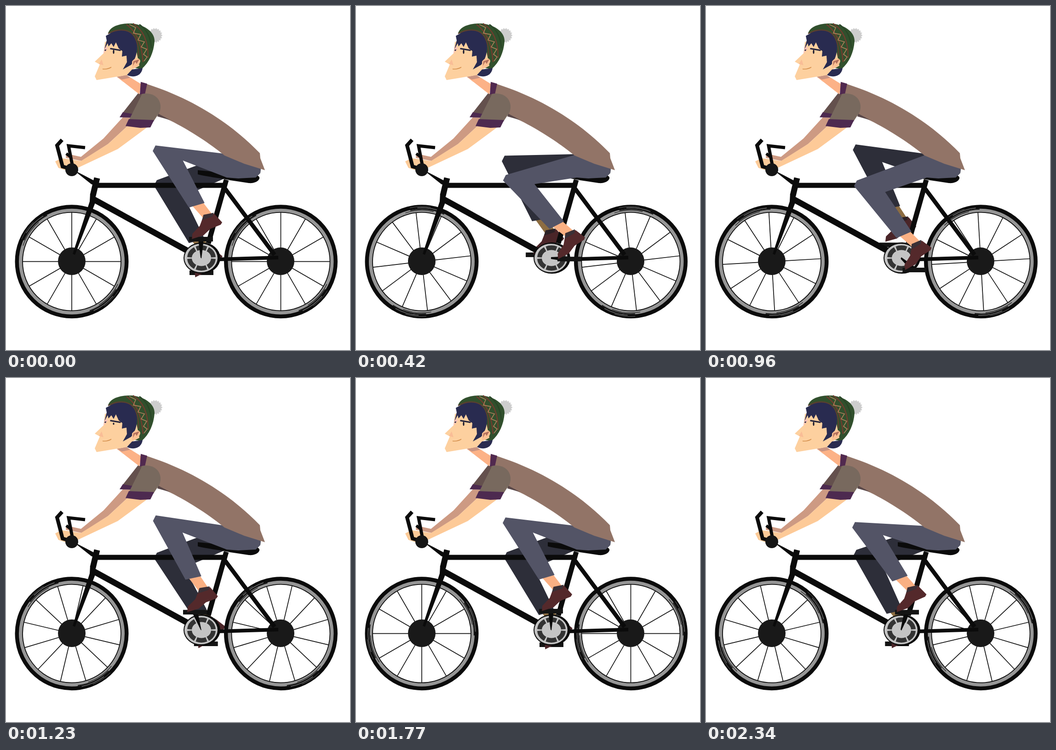
These frames come from a looping animation (748 by 748 pixels, 2370 ms). An HTML page:

```html
<!DOCTYPE html>
<html lang="en">
<head>
<meta charset="utf-8">
<title>Cyclist</title>
<style>
html, body { margin: 0; width: 100%; height: 100%; overflow: hidden; background: #fff; }
svg { display: block; width: 100%; height: 100%; }
.line { fill: none; stroke: #0b0b0b; }
</style>
</head>
<body>
<svg viewBox="0 0 748 748">
  <defs>
    <g id="wheel">
      <circle r="118.5" class="line" stroke-width="10"/>
      <circle r="111" fill="none" stroke="#969696" stroke-width="8"/>
      <circle r="107" class="line" stroke-width="1.8"/>
      <g id="grain" fill="none"/>
      <g id="spokes" stroke="#111" stroke-width="1.7"/>
    </g>
  </defs>

  <g id="farLeg"></g>

  <g id="front"><use href="#wheel"/></g>
  <g id="rear"><use href="#wheel"/></g>
  <circle cx="143" cy="555" r="30" fill="#191919"/>
  <circle cx="597" cy="555" r="30" fill="#191919"/>

  <g id="bike" class="line">
    <path d="M195 390H472" stroke-width="11"/>
    <path d="M190 420L396 533" stroke-width="13"/>
    <path d="M479 378L440 516" stroke-width="11"/>
    <path d="M474 394L584 541" stroke-width="9"/>
    <path d="M458 551L592 547" stroke-width="8"/>
    <path d="M198 374L189 412" stroke-width="13"/>
    <path d="M183 408L195 412L194 428L150 541L145 539L182 425Z" fill="#0b0b0b" stroke="none"/>
    <path d="M146 356L194 381L194 391L185 387Z" fill="#0b0b0b" stroke="none"/>
    <path d="M417 357L470 362C520 364 554 364 551 375C549 382 538 386 528 385L488 379C465 374 430 370 417 366Z" fill="#0b0b0b" stroke="none"/>
  </g>

  <g id="ring">
    <ellipse cx="426" cy="548" rx="40" ry="34" fill="#0b0b0b"/>
    <ellipse cx="424" cy="548" rx="36" ry="31" fill="#c4c4c4"/>
    <ellipse cx="425" cy="548" rx="26" ry="22.5" fill="none" stroke="#333" stroke-width="10"
      pathLength="60" stroke-dasharray="8.7 1.3" stroke-dashoffset="-.65"/>
  </g>

  <g id="nearLeg"></g>

  <g id="body">
    <path d="M254 242L274 243L263 262L222 300L165 337L130 330L131 321L163 328L212 288Z" fill="#cd9a83"/>
    <path d="M287 190L313 196L282 238L254 232Z" fill="#64504d"/>
    <path d="M254 231L283 236L276 243L247 242Z" fill="#4d2a50"/>
    <path d="M241 154L262 150L294 170L290 192Z" fill="#fcb287"/>
    <path d="M241 154L262 150L270 156L252 160Z" fill="#c99582"/>
    <path d="M301 168C400 199 484 250 552 320L553 331L563 357L518 343L475 325C440 296 392 266 357 249L325 234L294 192Z" fill="#927467"/>
    <path d="M293 165L307 169L302 192L291 192Z" fill="#51294f"/>
    <path d="M331 234L357 248L329 240Z" fill="#594748"/>
    <path d="M107 338L120 331L137 333L163 337L222 300L264 261L308 263L243 311L158 351L132 358L114 352Z" fill="#fdca98"/>
    <path d="M296 191C326 186 342 208 334 231L320 252L267 249Z" fill="#78695e"/>
    <path d="M267 246L322 248L314 264L292 265L260 261Z" fill="#4d2a50"/>
    <path d="M122 291L111 303L123 349L137 353" class="line" stroke="#151515" stroke-width="8"/>
    <path d="M172 308L136 304L145 350" class="line" stroke-width="7"/>
    <path d="M131 321L139 327" class="line" stroke-width="6"/>
    <circle cx="143" cy="356" r="14" fill="#151515"/>
  </g>

  <g id="head">
    <path id="pompom" fill="#cdcdcd"/>
    <path d="M222 59C226 45 246 37 274 38C302 41 324 57 323 77C321 101 312 122 295 137L274 134L262 64Z" fill="#31502d"/>
    <path d="M215 78L212 103L193 121L204 127L193 153L197 161L263 150L277 137L290 130L284 100L262 68Z" fill="#fdd09f"/>
    <path d="M215 86L222 92L212 104Z" fill="#f9c4b7"/>
    <path d="M208 116L212 129L202 126Z" fill="#f9bd96"/>
    <path d="M214 94L219 75L217 65L240 52C262 49 279 60 284 80C287 98 282 116 272 128L254 138L263 122L262 108L252 110L253 98L245 92L239 79L234 89L229 81L223 88L221 81Z" fill="#292b50"/>
    <path d="M263 150L274 138L297 135C295 150 281 158 263 150Z" fill="#292b50"/>
    <path d="M274 121C279 112 291 111 292 120C290 130 281 135 274 135Z" fill="#fbc194"/>
    <path d="M277 120L290 116L284 126L281 121L276 130Z" fill="#b3705c"/>
    <path d="M227 91L250 95L249 98L226 94ZM213 96L218 94L217 98Z" fill="#24243d"/>
    <path d="M210 137C218 138 224 136 229 133" fill="none" stroke="#d48f4d" stroke-width="1.5"/>
    <g fill="none" stroke-width="2.5">
      <path d="M222 60C250 45 273 53 281 69C287 82 289 96 288 110" stroke="#5c3f2e"/>
      <path d="M262 40C282 55 295 78 298 122M276 38C296 50 309 72 309 112" stroke="#713c2e"/>
      <path d="M268 40L282 47L277 59L293 62L287 74L301 78L294 89L306 94L299 105L307 111L300 120" stroke="#a97d58" stroke-width="1.8"/>
      <path d="M290 40Q314 56 316 92" stroke="#284526"/>
    </g>
    <ellipse id="eye" rx="1.6" ry="4.5" fill="#17172b"/>
  </g>
</svg>
<script>
const STEP = 30, STEPS = 79;
const HIP = [540, 345], THIGH = 223, SHIN = 188.4;
const rad = d => d * Math.PI / 180;
const cosd = d => Math.cos(rad(d)), sind = d => Math.sin(rad(d));
const $ = id => document.getElementById(id);

function add(parent, tag, attrs) {
  const el = document.createElementNS('http://www.w3.org/2000/svg', tag);
  for (const k in attrs) el.setAttribute(k, attrs[k]);
  return parent.appendChild(el);
}
const poly = (el, pts) => el.setAttribute('points', pts.map(p => p.map(v => v.toFixed(1))).join(' '));

for (let a = 0; a < 360; a += 30)
  add($('spokes'), 'path', { d: 'M0-28V-107', transform: `rotate(${a})` });

// Brush marks on the tyres, angles counter-clockwise from the top
function arc(r, from, to, stroke, width) {
  const at = a => [-r * sind(a), -r * cosd(a)];
  add($('grain'), 'path', { d: `M${at(from)}A${r} ${r} 0 0 0 ${at(to)}`, stroke, 'stroke-width': width });
}
for (const a of [48, 220]) {
  arc(114, a - 20, a + 18, '#151515', 2.2);
  arc(111.5, a - 8, a + 24, '#2a2a2a', 1.4);
  arc(117, a - 16, a + 10, '#808080', 1.2);
  arc(119.5, a - 4, a + 18, '#666', 0.9);
}

let fluff = '';
for (let i = 0; i < 36; i++) {
  const r = i % 2 ? 13.5 : 16.5;
  fluff += (i ? 'L' : 'M') + [324 + r * cosd(i * 10), 64 + r * sind(i * 10)];
}
$('pompom').setAttribute('d', fluff + 'Z');

function makeLeg(group, { pants, shoe, collar, skin, axle, reach, sway }) {
  const part = fill => add(group, 'polygon', { fill });
  const crank = part('#0b0b0b'), pedal = part('#141414');
  const sock = part(skin), foot = part(shoe), cuff = part(collar), leg = part(pants);

  return phase => {
    const px = axle[0] - reach[0] * sind(phase), py = axle[1] - reach[1] * cosd(phase);
    const nx = cosd(phase), ny = -sind(phase);
    poly(crank, [[axle[0] - nx, axle[1] - ny], [axle[0] + nx, axle[1] + ny + 2],
      [px + 6 * nx, py + 6 * ny], [px - 6 * nx, py - 6 * ny]]);
    poly(pedal, [[px - 26, py - 5], [px + 26, py - 5], [px + 26, py + 5], [px - 26, py + 5]]);

    // Foot hinged at the toe
    const toe = [px - 15.5 - 8.5 * cosd(phase - 290), py - 2 - sway * cosd(phase)];
    const tilt = 31 + 7 * cosd(phase - 230), c = cosd(tilt), s = sind(tilt);
    const onFoot = (x, y) => [toe[0] + x * c + y * s, toe[1] - x * s + y * c];
    const ankle = onFoot(50, -25);

    // Knee from hip and ankle
    const dx = HIP[0] - ankle[0], dy = ankle[1] - HIP[1], d = Math.hypot(dx, dy);
    const bend = Math.acos((THIGH ** 2 + d * d - SHIN ** 2) / (2 * THIGH * d));
    const a = Math.atan2(dy, dx) - bend;
    const knee = [HIP[0] - THIGH * Math.cos(a), HIP[1] + THIGH * Math.sin(a)];
    const lean = Math.atan2(ankle[0] - knee[0], ankle[1] - knee[1]) - rad(7);
    const u = Math.sin(lean), v = Math.cos(lean);
    const onShin = (x, y) => [knee[0] + x * v + y * u, knee[1] - x * u + y * v];

    poly(sock, [onShin(7, 140), onShin(31, 145), onFoot(62, -25), onFoot(42, -22)]);
    poly(foot, [onFoot(-2, 1), onFoot(4, -9), onFoot(26, -17), onFoot(40, -30),
      onFoot(66, -27), onFoot(73, -2), onFoot(68, 1), onFoot(44, -1), onFoot(24, 5)]);
    poly(cuff, [onFoot(36, -26), onFoot(44, -35), onFoot(66, -29), onFoot(60, -23)]);
    poly(leg, [knee, [knee[0] + 6, knee[1] - 12], [482, 322], [530, 334], [554, 352], [553, 363],
      [543, 373], [505, 375], [480, 373], onShin(44, 53), onShin(34, 156), onShin(0, 146)]);
  };
}
const farLeg = makeLeg($('farLeg'), {
  pants: '#2d2e39', shoe: '#4a2528', collar: '#2b2024', skin: '#8d6d42',
  axle: [425, 544], reach: [30, 36], sway: 10
});
const nearLeg = makeLeg($('nearLeg'), {
  pants: '#535466', shoe: '#54292b', collar: '#3b3036', skin: '#fab083',
  axle: [424, 547], reach: [40, 40], sway: 0
});

function draw(k) {
  const phase = 360 * (k % 20) / 19;
  nearLeg(phase);
  farLeg(phase + 180);
  const spin = 120 * (k % 10) / 9;
  $('front').setAttribute('transform', `translate(143 555.7) rotate(${spin})`);
  $('rear').setAttribute('transform', `translate(597.5 555.7) rotate(${spin})`);
  const open = Math.min(1, Math.max(0.12, (Math.abs(k - 38.5) - 1) / 3));
  $('eye').setAttribute('transform', `translate(234 99.5) scale(1 ${open})`);
}

const start = performance.now();
function tick() {
  draw(Math.floor((performance.now() - start) / STEP) % STEPS);
  requestAnimationFrame(tick);
}
draw(0);
requestAnimationFrame(tick);
</script>
</body>
</html>
```
